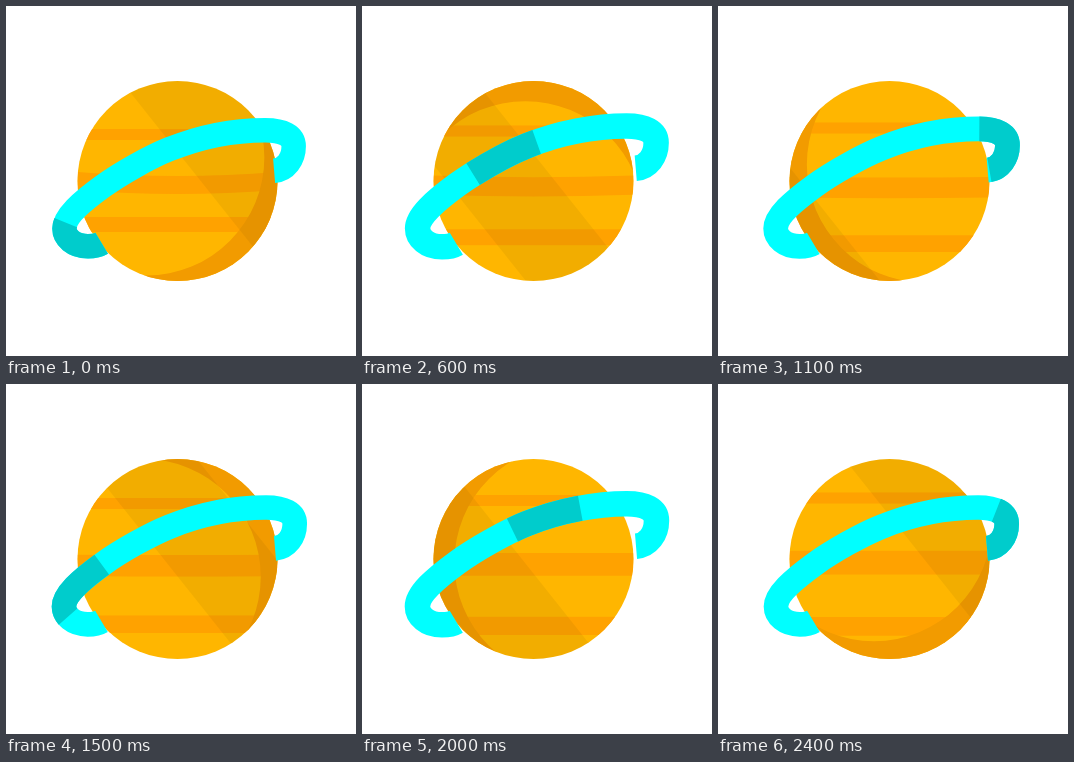
Recreate the animation shown at these times as an HTML page with a canvas. Size 350 by 350 pixels, loop 2500 ms.

```html
<!DOCTYPE html>
<html lang="en">
<head>
<meta charset="utf-8">
<title>Planet</title>
<style>
html, body { margin: 0; width: 100%; height: 100%; overflow: hidden; background: #fff; }
canvas { display: block; }
</style>
</head>
<body>
<canvas id="stage" width="350" height="350"></canvas>
<script>
const ctx = document.getElementById('stage').getContext('2d');
const LOOP = 2.5, TURN = LOOP / 2, STEPS = 25; // seconds, poses per loop
const CX = 171.5, CY = 175, R = 100;
const rad = deg => deg * Math.PI / 180;

// Direction of the dark side in degrees, over time
const darkSide = [[0, 37], [0.4, -27], [1.1, -205], [1.5, -387], [LOOP, -683]];

// An open band whose two ends stop at the planet's edge
const ring = new Path2D(
  'M95 236C90 239 85 239 81 239C66 239 57 230 57 221C57 209 74 194 96 178' +
  'C114 165 144 148 164 140C196 127 232 120.5 262 120.5' +
  'C280 120.5 291 126 291 137C291 150 283 161 271 162');

function tween(keys, t) {
  const i = keys.findIndex(key => key[0] > t);
  const [t0, a] = keys[i - 1], [t1, b] = keys[i];
  return a + (b - a) * (t - t0) / (t1 - t0);
}

function drawBand(top, height, sag) {
  const left = CX - R, right = CX + R, bottom = top + height;
  ctx.beginPath();
  ctx.moveTo(left, top);
  ctx.quadraticCurveTo(CX, top + 2 * sag, right, top);
  ctx.lineTo(right, bottom);
  ctx.quadraticCurveTo(CX, bottom + 2 * sag, left, bottom);
  ctx.fill();
}

// The bands drift apart over the loop
function drawBands(t) {
  const u = t / LOOP, rest = (1 - u) ** 3;
  ctx.fillStyle = '#ffa200';
  drawBand(123 - 15 * u, 11, 0);
  drawBand(166 + 5 * Math.sin(Math.PI * u), 18 + 6 * u, 4 * rest);
  drawBand(233 - 22 * rest, 15 + 4 * u, 0);
}

// Everything outside a larger, shifted disc lies in the dark
function drawCrescent(t) {
  const angle = rad(tween(darkSide, t)), shift = 39;
  ctx.fillStyle = '#f29b00';
  ctx.beginPath();
  ctx.rect(0, 0, 350, 350);
  ctx.arc(CX - shift * Math.cos(angle), CY - shift * Math.sin(angle), 118, 0, 7);
  ctx.fill('evenodd');
}

// A slanted shade crosses the planet once per turn
function drawShade(t) {
  const q = (t + 0.1) % TURN;
  const lead = 27 - 80 * q - 80 * q * q, trail = 138 - 173 * q;
  ctx.translate(CX, CY);
  ctx.rotate(rad(-38.5));
  ctx.fillStyle = 'rgba(0,0,0,.05)';
  ctx.fillRect(lead, -R, trail - lead, 2 * R);
}

function drawPlanet(t) {
  ctx.save();
  ctx.beginPath();
  ctx.arc(CX, CY, R, 0, 7);
  ctx.fillStyle = '#ffb600';
  ctx.fill();
  ctx.clip();
  drawBands(t);
  drawCrescent(t);
  drawShade(t);
  ctx.restore();
}

// The ring swells a little while a dark stretch runs along it
function drawRing(t) {
  const q = t % TURN, swell = Math.cos(2 * Math.PI * (q - 0.7) / TURN);
  const head = 54 + 190 * q + 77 * q * q, tail = Math.max(0, head - 70);
  ctx.save();
  ctx.translate(174.5 + swell, 181 - swell);
  ctx.scale(1 + 0.022 * swell, 1 + 0.022 * swell);
  ctx.translate(-174.5, -179.5);
  ctx.lineWidth = 25;
  ctx.strokeStyle = '#0ff';
  ctx.stroke(ring);
  ctx.setLineDash([0, tail, head - tail, 999]);
  ctx.strokeStyle = '#00cccc';
  ctx.stroke(ring);
  ctx.restore();
}

function draw(seconds) {
  const step = LOOP / STEPS;
  const t = Math.floor(seconds % LOOP / step) * step;
  ctx.fillStyle = '#fff';
  ctx.fillRect(0, 0, 350, 350);
  drawPlanet(t);
  drawRing(t);
}

const start = performance.now();
function frame() {
  draw((performance.now() - start) / 1000);
  requestAnimationFrame(frame);
}
frame();
</script>
</body>
</html>
```
